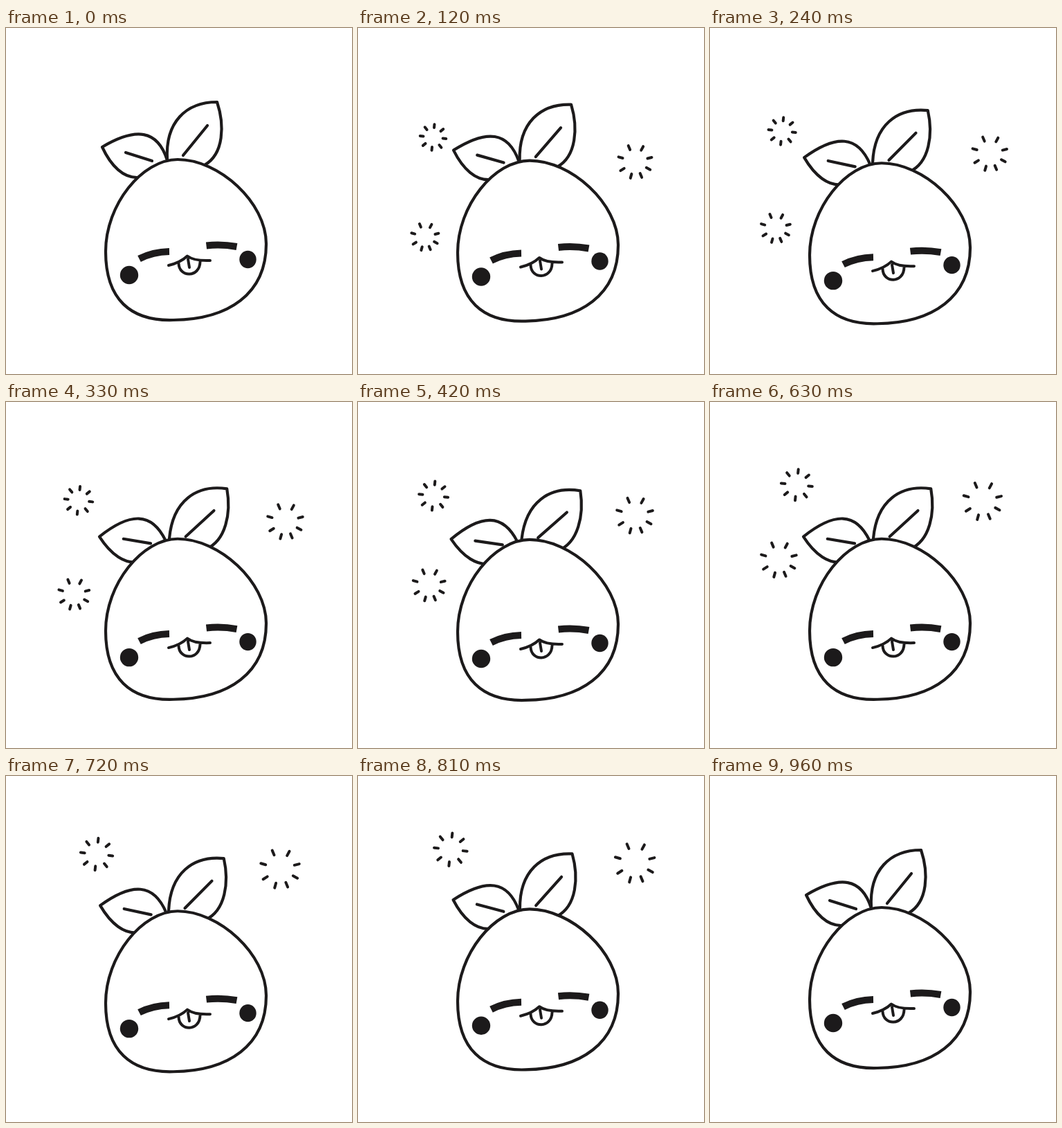
An HTML page with a canvas that plays this animation: 500 px wide and 500 px high, repeating every 1.05 s.

```html
<!DOCTYPE html>
<html lang="en">
<head>
<meta charset="utf-8">
<title>Happy sprout</title>
<style>
html, body { margin: 0; width: 100%; height: 100%; overflow: hidden; background: #fff; }
canvas { display: block; width: 100vw; height: 100vh; }
</style>
</head>
<body>
<canvas id="stage" width="500" height="500"></canvas>
<script>
const INK = '#1c1a1b', LOOP = 1050, STEP = 30, REST = 960, RAD = Math.PI / 180;
const g = document.getElementById('stage').getContext('2d');

const body = 'M248 190C308 190 376 252 376 312C376 384 322 421 242 422C180 424 144 392 144 323C144 255 197 190 248 190Z';
const root = { x: 233, y: 190 };
const leaves = [
  { shape: 'M233 191C219 147 188 143 139 172C152 200 170 217 191 216', vein: 'M173 180L211 192', dx: -2.8, dy: 10.9, turn: -9.2 },
  { shape: 'M233 190C230 136 260 107 305 107C316 140 315 182 287 198', vein: 'M256 184L291 141', dx: 3.5, dy: 8.2, turn: 9.6 }
];
const eyes = 'M192.5 333.5Q212 323.5 236 323M289.5 314.5Q311 312 333.5 316';
const mouth = 'M235 343Q252 339 262 329.5Q272 337 295 336M249.5 340C250 361 280 361 280.5 338M263 334L265 346';

// Sparkles rise while swaying sideways and growing
const sparkles = [
  { x: 119, sway: -15, speed: .0055, peak: 265, y: 167, rise: .075, lift: 0, r: 18, grow: .0073, tilt: -129, skew: 0, end: 870 },
  { x: 399, sway: 5.3, speed: .009, peak: 265, y: 204.8, rise: .0983, lift: 0, r: 24, grow: .0065, tilt: -113, skew: 9, end: 870 },
  { x: 99.3, sway: -4.7, speed: .0112, peak: 210, y: 311.5, rise: .07, lift: .0001, r: 18.8, grow: .0117, tilt: -113, skew: 9, end: 660 }
];

function line(d, width, cap = 'round') {
  g.lineWidth = width;
  g.lineCap = cap;
  g.stroke(new Path2D(d));
}

function fillLine(d, width) {
  g.fillStyle = '#fff';
  g.fill(new Path2D(d));
  line(d, width);
}

function dot(x, y, rx, ry) {
  g.beginPath();
  g.ellipse(x, y, rx, ry, 0, 0, 2 * Math.PI);
  g.fillStyle = INK;
  g.fill();
}

function drawLeaf(leaf, s) {
  g.save();
  g.translate(root.x + leaf.dx * s, root.y + leaf.dy * s);
  g.rotate(leaf.turn * s * RAD);
  g.translate(-root.x, -root.y);
  fillLine(leaf.shape, 4.2);
  line(leaf.vein, 4.2);
  g.restore();
}

function drawSparkle(p, t) {
  if (t < STEP || t > p.end) return;
  const x = p.x + p.sway * Math.cos(p.speed * (t - p.peak));
  const y = p.y - p.rise * t - p.lift * t * t;
  const r = p.r + p.grow * t;
  g.beginPath();
  for (let k = 0; k < 8; k++) {
    const a = (p.tilt + 45 * k + p.skew * Math.sin(k * Math.PI / 4)) * RAD;
    const c = Math.cos(a) * r, s = Math.sin(a) * r;
    g.moveTo(x + c * .75, y + s * .75);
    g.lineTo(x + c, y + s);
  }
  g.lineWidth = 4;
  g.lineCap = 'round';
  g.stroke();
}

function draw(t) {
  // Sink, pause, rise: symmetric around the middle of the move
  const phase = Math.min(1, Math.min(t, REST - t) / 435);
  const s = (1 - Math.cos(Math.PI * phase)) / 2;

  g.clearRect(0, 0, 500, 500);
  g.strokeStyle = INK;
  g.lineJoin = 'round';
  leaves.forEach(leaf => drawLeaf(leaf, s));

  g.save();
  g.translate(0, 9 * s);
  fillLine(body, 4.2);
  g.translate(0, 5 * s);
  line(eyes, 10, 'butt');
  line(mouth, 4);
  dot(178, 357, 13.2, 13.2);
  dot(349.5, 334.5, 12.2, 12.7);
  g.restore();

  sparkles.forEach(p => drawSparkle(p, t));
}

function tick() {
  const t = performance.now() % LOOP;
  draw(Math.min(REST, Math.floor(t / STEP) * STEP));
  requestAnimationFrame(tick);
}
tick();
</script>
</body>
</html>
```
